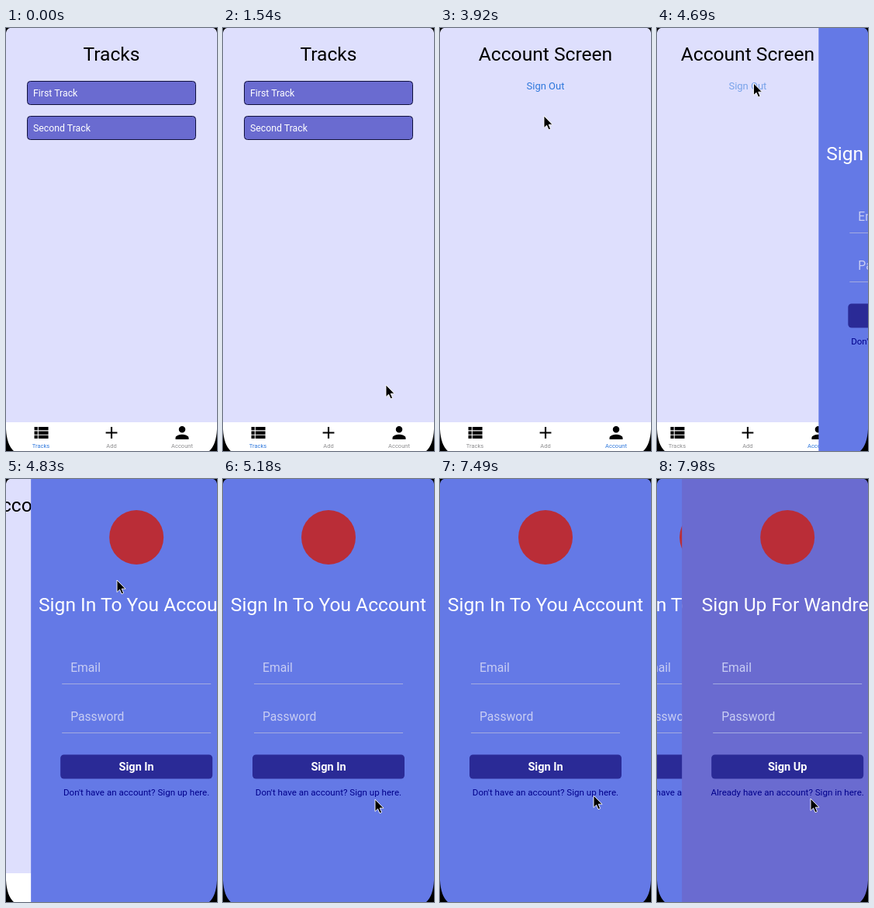
Animation, 272 px wide and 544 px high, one loop 8000 ms. Source, as an HTML page:

```html
<!DOCTYPE html>
<html lang="en">
<head>
<meta charset="utf-8">
<title>Sign-out flow</title>
<style>
  html, body { margin: 0; width: 272px; height: 544px; overflow: hidden; }
  svg { display: block; font-family: Roboto, Inter, sans-serif; }
  .mid { text-anchor: middle; }
  .title { font-size: 24.6px; }
  .card { font-size: 12.3px; fill: #fff; }
  .field { font-size: 15.7px; fill: #c8cdf3; }
  .button { font-size: 14.5px; font-weight: 700; fill: #fff; }
  .link { font-size: 11.6px; fill: #00008b; }
  .tab { font-size: 7.5px; }
</style>
</head>
<body>
<svg id="stage" width="272" height="544" viewBox="0 0 272 544"></svg>
<script>
const LOOP = 8000, STEP = 70, W = 272;
const ACTIVE = '#2f78dc', IDLE = '#8e8e90';

const text = (cls, x, y, str, attrs = '') =>
  `<text class="${cls}" x="${x}" y="${y}" ${attrs}>${str}</text>`;
const centred = (cls, y, str, attrs) => text(cls + ' mid', 136, y, str, attrs);
const page = fill => `<rect width="272" height="544" fill="${fill}"/>`;

const card = (y, name) =>
  `<rect x="27.5" y="${y + .5}" width="217" height="30" rx="4" fill="#6a6bd0" stroke="#10103c"/>` +
  text('card', 35, y + 20, name);

const tab = (id, x, name, icon) =>
  `<path transform="translate(${x - 12.7} 507.8) scale(1.06)" d="${icon}"/>` +
  text('tab mid', x, 540, name, `id="${id}"`);

const field = (y, name) =>
  text('field', 51, y, name) +
  `<path d="M40 ${y + 15.5}H232" stroke="#a3aae0"/>`;

const form = (id, fill, title, action, link) => `<g id="${id}">${page(fill)}
  <circle cx="136" cy="75" r="35" fill="#ba2d37"/>
  ${centred('title', 169.5, title, 'fill="#fff"')}
  ${field(248, 'Email')}${field(311, 'Password')}
  <rect x="38" y="354.5" width="196" height="31" rx="4.5" fill="#2a2a96"/>
  ${centred('button', 375.3, action)}${centred('link', 407, link)}</g>`;

stage.innerHTML = `
  <g id="home">${page('#dedffd')}
    <g id="tracks">${centred('title', 41.5, 'Tracks')}
      ${card(68, 'First Track')}${card(113, 'Second Track')}</g>
    <g id="account">${centred('title', 41.5, 'Account Screen')}
      ${centred('', 79.3, 'Sign Out', `id="signOut" font-size="13" fill="${ACTIVE}"`)}</g>
    <rect y="507" width="272" height="37" fill="#fff"/>
    ${tab('tracksTab', 45, 'Tracks', 'M4 5h4v4H4zm5 0h12v4H9zM4 10h4v4H4zm5 0h12v4H9zM4 15h4v4H4zm5 0h12v4H9z')}
    ${tab('addTab', 136, 'Add', 'M11 5h2v6h6v2h-6v6h-2v-6H5v-2h6z')}
    ${tab('accountTab', 227, 'Account', 'M12 4a4 4 0 0 1 0 8a4 4 0 0 1 0-8zM4 20v-2c0-2.7 5.3-4 8-4s8 1.3 8 4v2z')}
  </g>
  ${form('signIn', '#6479e6', 'Sign In To You Account', 'Sign In', "Don't have an account? Sign up here.")}
  ${form('signUp', '#6a6bd0', 'Sign Up For Wandrel', 'Sign Up', 'Already have an account? Sign in here.')}
  <path id="cursor" d="M0 0V15.5L3.6 12.2L6 17.8L8.6 16.7L6.2 11.2H11Z" stroke="#fff" stroke-width=".9"/>
  <path d="M0 0H5Q1 1 0 6ZM272 0H267Q271 1 272 6ZM0 516Q1 536 10 544H0ZM272 516Q271 536 262 544H272Z"/>`;

const $ = id => document.getElementById(id);
const move = (id, x, y = 0) => $(id).setAttribute('transform', `translate(${x} ${y})`);

// Keys are [time, ...values], joined by straight lines.
function track(keys, t) {
  const i = keys.findIndex(k => k[0] > t);
  if (i < 0) return keys[keys.length - 1].slice(1);
  if (i === 0) return keys[0].slice(1);
  const [a, b] = [keys[i - 1], keys[i]], f = (t - a[0]) / (b[0] - a[0]);
  return a.slice(1).map((v, n) => v + (b[n + 1] - v) * f);
}

const POINTER = [
  [560, 54, 560], [630, 54, 527], [840, 90, 300], [980, 140, 161], [1120, 180, 260],
  [1400, 206, 443], [1680, 214, 475], [2240, 228, 526], [2450, 238, 503],
  [2660, 228, 523], [3080, 228, 523], [3150, 227, 523], [3220, 227, 523],
  [3430, 214, 440], [3780, 150, 160], [4060, 118, 66], [4200, 124.5, 71],
  [4690, 124.5, 71], [4830, 143, 130], [4970, 172, 285], [5180, 196, 412],
  [5600, 196, 412], [5880, 202, 426], [6090, 198, 420], [6230, 198, 417],
  [6300, 198, 417], [6510, 208, 414], [6720, 198, 411], [7210, 198, 411],
  [7490, 198, 407], [7630, 198, 411]
];
const PRESS = [[4340, 1], [4410, .6], [4480, .25], [4620, .35], [4690, .58], [4760, 1]];

// Cubic bezier (.283, .99, .318, .99), solved by bisection.
function push(t, start) {
  const x = Math.min(1, Math.max(0, (t - start) / 470));
  const curve = (s, p, q) => 3 * (1 - s) ** 2 * s * p + 3 * (1 - s) * s * s * q + s ** 3;
  let lo = 0, hi = 1;
  for (let i = 0; i < 24; i++) {
    const s = (lo + hi) / 2;
    if (curve(s, .283, .318) < x) lo = s; else hi = s;
  }
  return x === 0 ? 0 : x === 1 ? 1 : curve(lo, .99, .99);
}

function draw(t) {
  const onAccount = t >= 2800;
  $('tracks').style.display = onAccount ? 'none' : '';
  $('account').style.display = onAccount ? '' : 'none';
  $('tracksTab').style.fill = onAccount ? IDLE : ACTIVE;
  $('addTab').style.fill = IDLE;
  $('accountTab').style.fill = onAccount ? ACTIVE : IDLE;
  $('signOut').style.opacity = track(PRESS, t)[0];

  const first = push(t, 4658), second = push(t, 7808);
  move('home', -.3 * W * first);
  move('signIn', W * (1 - first) - .3 * W * second);
  move('signUp', W * (1 - second));
  move('cursor', ...track(POINTER, t));
}

const began = performance.now();
function frame() {
  const t = (performance.now() - began) % LOOP;
  draw(Math.floor(t / STEP) * STEP);
  requestAnimationFrame(frame);
}
frame();
</script>
</body>
</html>
```
